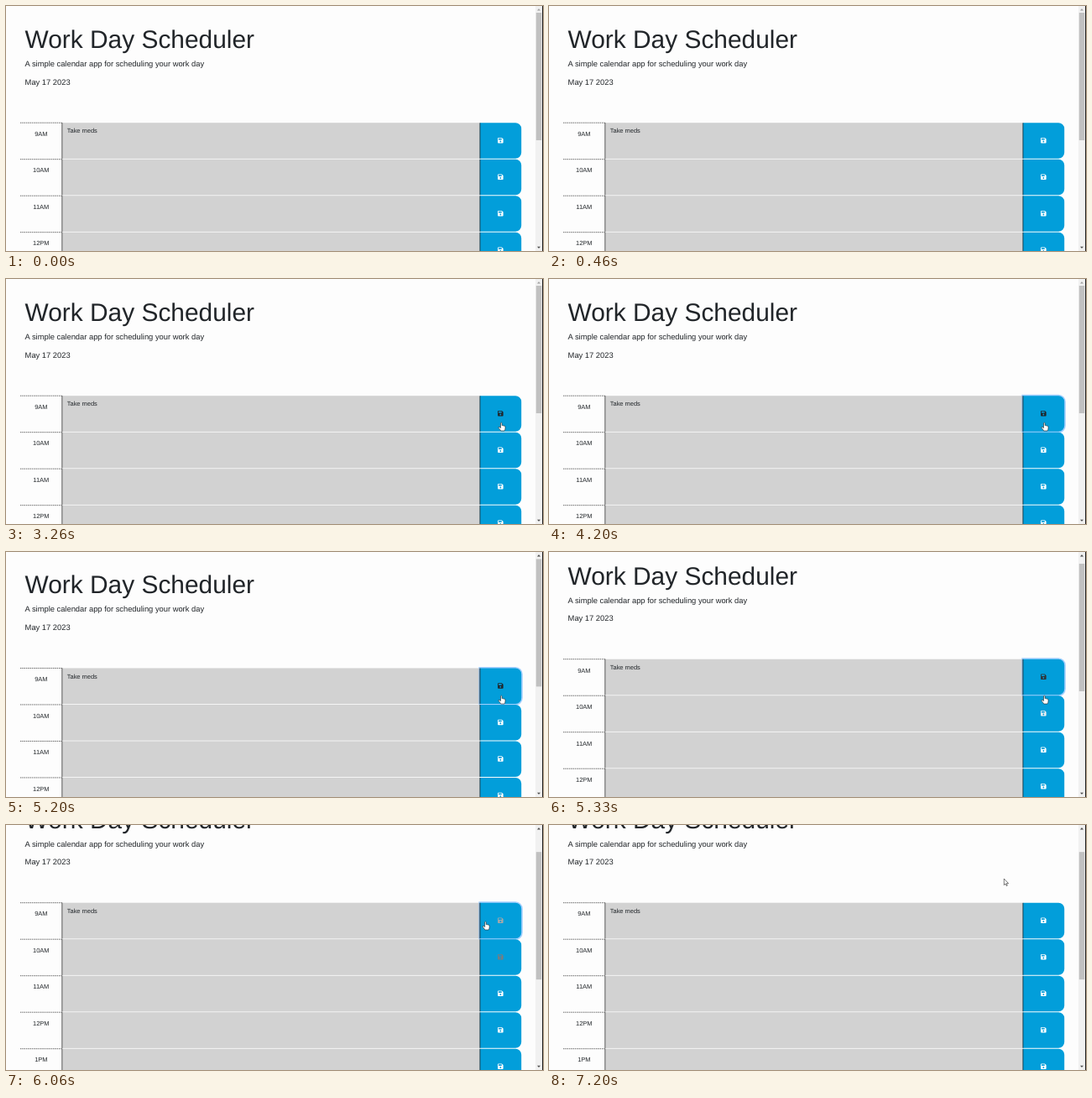
Animation of 640 by 292 pixels, one loop 8 s. Source, as an HTML page:

```html
<!DOCTYPE html>
<html lang="en">
<head>
<meta charset="utf-8">
<title>Scheduler</title>
<style>
  html, body { margin: 0; width: 100%; height: 100%; overflow: hidden; background: #fdfdfd; }
  svg { display: block; width: 100vw; height: 100vh; }
  text {
    font-family: "Liberation Sans", Arial, sans-serif;
    font-size: 7.45px; fill: #212529; text-rendering: geometricPrecision;
  }
  .title { font-size: 29.9px; }
  .lead { font-size: 9.35px; }
  .hour { text-anchor: middle; }
</style>
</head>
<body>
<svg viewBox="0 0 640 292">
  <g id="page">
    <text class="title" x="22.5" y="50.1">Work Day Scheduler</text>
    <text class="lead" x="22.6" y="72.1">A simple calendar app for scheduling your work day</text>
    <text class="lead" x="22.6" y="93.7">May 17 2023</text>
    <g id="rows"></g>
    <text x="72.8" y="151.3">Take meds</text>
  </g>
  <rect x="631" width="8" height="292" fill="#f1f1f1"/>
  <path id="up" d="M633 5.4h4l-2-2.3z"/>
  <path d="M633 286.8h4l-2 2.3z" fill="#505050"/>
  <rect id="thumb" x="631.8" width="6.4" height="152" fill="#c1c1c1"/>
  <rect x="639" width="1" height="292" fill="#222"/>
  <g id="cursor" fill="#fff" stroke="#222" stroke-width=".6" stroke-linejoin="round">
    <path id="hand" d="M-.8 .7Q0-.5 .8 .7V3.6Q1.7 3 2.2 3.9Q3.1 3.4 3.6 4.3Q4.6 4 4.7 5.2V7.2Q4.5 8.8 3.7 10H-.6Q-1.4 8.4-3.2 6.4Q-3.6 5.2-2.3 5.3L-.8 6.5Z"/>
    <path id="arrow" d="M0 0V7.6L1.7 6L2.9 8.6L4 8.1L2.9 5.6H5.3Z"/>
  </g>
</svg>
<script>
const LOOP = 8000, FRAME = 200 / 3, FADE = 150;
const ROW_TOP = 138.8, ROW_PITCH = 43.5, BUTTON_LEFT = 565, BUTTON_RIGHT = 614;
const HOURS = ["9AM", "10AM", "11AM", "12PM", "1PM"];
const ENTER = 2800, CLICK = 4000, BLUR = 6600;

const easeIn = u => u ** 3;
const easeOut = u => 1 - (1 - u) ** 2;

const $ = id => document.getElementById(id);
const clamp = v => Math.max(0, Math.min(1, v));
const progress = (t, start, end) => clamp((t - start) / (end - start));

const DISK = "M1.5 0H10.3L14 3.7V12.5A1.5 1.5 0 0 1 12.5 14H1.5A1.5 1.5 0 0 1 0 12.5V1.5A1.5 1.5 0 0 1 1.5 0Z" +
  "M2 2V5.7H10V2ZM7 7.8a2 2 0 1 0 0 4a2 2 0 1 0 0-4Z";
const BUTTON = "M565 .5h42.2a7 7 0 0 1 7 7v28.5a7 7 0 0 1 -7 7h-42.2z";

$("rows").innerHTML = HOURS.map((hour, i) => `
  <g transform="translate(0 ${ROW_TOP + i * ROW_PITCH})">
    <path d="M17 .4H66.5" stroke="#222" stroke-width=".7" stroke-dasharray="1.4 .9"/>
    <text class="hour" x="41.8" y="16.2">${hour}</text>
    <rect x="67" y=".4" width="497.5" height="42.7" fill="#d2d2d2"/>
    <path d="M66.8 .2V43.3" stroke="#333" stroke-width=".8"/>
    ${i ? "" : `<path id="ring" d="${BUTTON}" fill="none" stroke="#007bff" stroke-width="3.2"/>`}
    <path d="${BUTTON}" fill="#029eda"/>
    <path d="M564.9 .5V43" stroke="#163848"/>
    <path class="disk" d="${DISK}" fill-rule="evenodd" transform="translate(586.1 18.1) scale(.465)"/>
  </g>`).join("");
const disks = [...document.querySelectorAll(".disk")];

const scrollAt = t => 46.5 * easeIn(progress(t, 5110, 5466));

function pointerAt(t) {
  const enter = 1 - easeOut(progress(t, ENTER, 3200));
  const leave = easeIn(progress(t, 5660, 6150));
  const settle = easeOut(progress(t, 6460, 6700));
  return {
    x: 590.3 + 5 * enter - 33 * leave - 15 * settle,
    y: 171 + 117 * enter - 98 * leave - 9 * settle
  };
}

// Index of the row whose save button is under the pointer, or -1
function hoveredRow(t) {
  const { x, y } = pointerAt(t);
  if (t < ENTER || x < BUTTON_LEFT || x > BUTTON_RIGHT) return -1;
  return Math.max(-1, Math.floor((y + scrollAt(t) - ROW_TOP) / ROW_PITCH));
}

// A linear fade equals the share of the last FADE ms spent hovering
function hoverAmount(row, t) {
  const samples = 15;
  let hits = 0;
  for (let i = 0; i < samples; i++) {
    if (hoveredRow(t - FADE * i / samples) === row) hits++;
  }
  return hits / samples;
}

function iconColor(u) {
  const channel = dark => Math.round(255 + (dark - 255) * u);
  return `rgb(${channel(33)},${channel(37)},${channel(41)})`;
}

function render(time) {
  const t = Math.floor((time % LOOP + 7) / FRAME) * FRAME;
  const scroll = scrollAt(t);
  $("page").setAttribute("transform", `translate(0 ${-scroll})`);
  $("thumb").setAttribute("y", 8 + scroll * .52);
  $("up").setAttribute("fill", scroll ? "#505050" : "#a3a3a3");

  disks.forEach((disk, row) => disk.setAttribute("fill", iconColor(hoverAmount(row, t))));
  const focus = progress(t, CLICK, CLICK + FADE) - progress(t, BLUR, BLUR + FADE);
  $("ring").setAttribute("stroke-opacity", .35 * focus);

  const { x, y } = pointerAt(t);
  const overButton = hoveredRow(t) >= 0;
  $("cursor").setAttribute("transform", `translate(${x} ${y})`);
  $("cursor").setAttribute("opacity", t < ENTER ? 0 : 1);
  $("hand").setAttribute("opacity", overButton ? 1 : 0);
  $("arrow").setAttribute("opacity", overButton ? 0 : 1);
}

const start = performance.now();
function tick() {
  render(performance.now() - start);
  requestAnimationFrame(tick);
}
tick();
</script>
</body>
</html>
```
